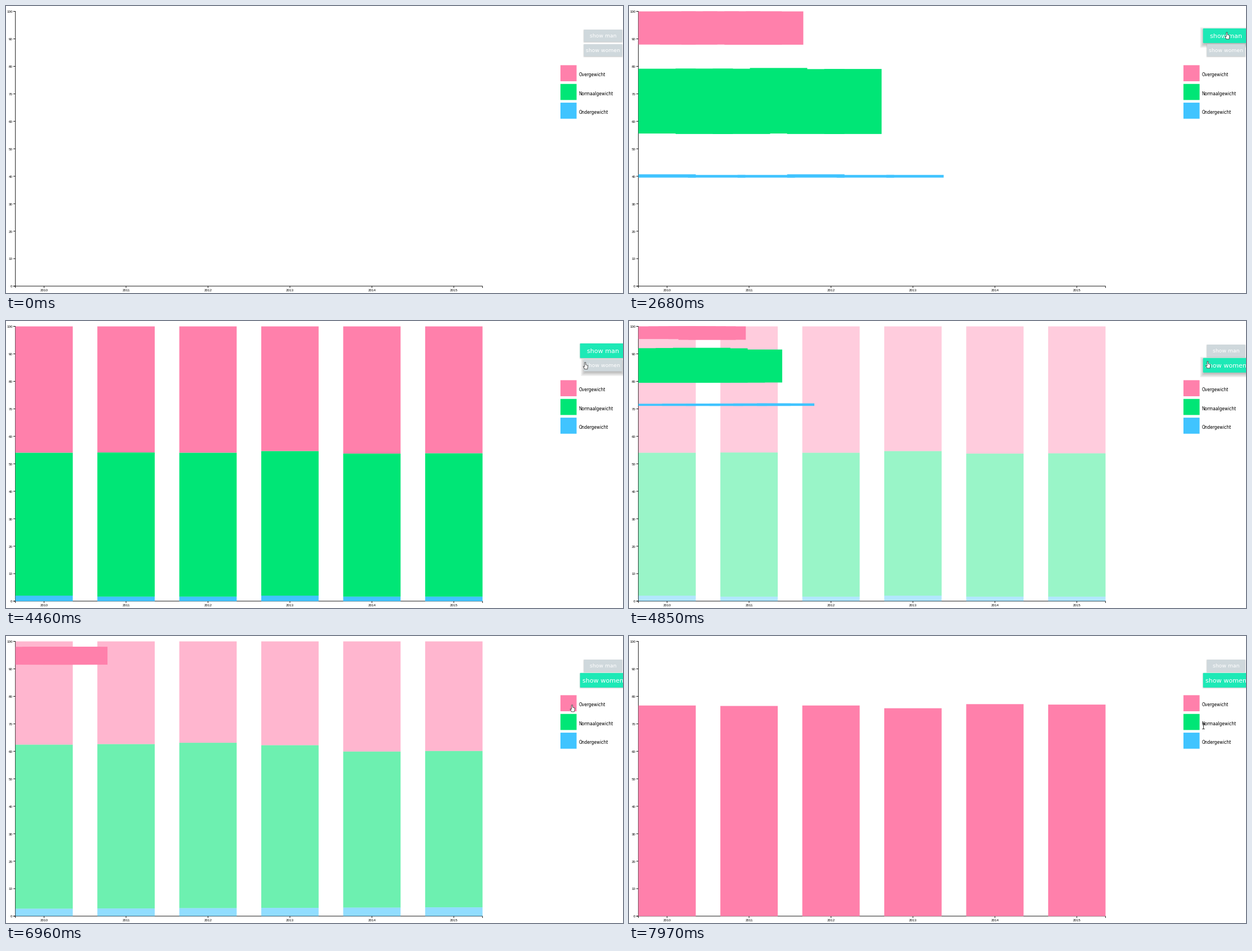
These frames come from a looping animation (1095x511 px, 8000 ms). A matplotlib script:

```python
import numpy as np
import matplotlib.pyplot as plt
from matplotlib.animation import FuncAnimation
from matplotlib.colors import to_rgb
from matplotlib.patches import FancyBboxPatch, Polygon, Rectangle

W, H, DPI = 1095, 511, 72          # at 72 dpi one point is one pixel
LOOP, STEP = 8000, 40
HOLD = 78                          # the screen is redrawn every HOLD ms

PINK, GREEN, BLUE = "#ff80ab", "#00e676", "#40c4ff"
GREY, TEAL = "#cfd8dc", "#1de9b6"

# chart geometry
X0, Y_TOP, Y_BASE = 16.7, 9.6, 498.8
UNIT = (Y_BASE - Y_TOP) / 100
YEARS = np.arange(6)
BAND = 829 / 5.7
BAR_W = 0.7 * BAND

GROW = {PINK: 1200, GREEN: 1000, BLUE: 900}
FADE = 700
CLICK_MAN, CLICK_WOMEN, CLICK_LEGEND = 2168, 4461, 6610

# pointer key points: time, x, y
TRACK = np.array([
    (130, 951, 505), (560, 699, 280), (780, 745, 201), (1700, 1050, 15),
    (2000, 1060, 46), (2652, 1061, 47), (3198, 1050, 36), (3440, 1040, 29),
    (3750, 1010, 45), (4300, 1028, 74), (4836, 1027, 72), (5304, 947, 66),
    (6030, 973, 119), (6400, 1003, 124), (7400, 1006, 122), (7956, 1019, 160),
])

ARROW = np.array([(0, 0), (0, 9.4), (2.1, 7.5), (3.6, 10.8), (4.9, 10.2),
                  (3.5, 7), (6.2, 6.8)])
HAND = np.array([(-1, 0), (1, 0), (1, 4), (5, 5.5), (4, 12), (-1, 12),
                 (-3.5, 7), (-1, 7.5)])
BEAM = np.array([(-2, -5), (2, -5), (0, -5), (0, 5), (2, 5), (-2, 5),
                 (0, 5), (0, -5)])


def ease(u):
    """Cubic in-out."""
    u = min(max(u, 0), 1)
    return 4 * u ** 3 if u < 0.5 else 1 - 4 * (1 - u) ** 3


def pulse(t, on, off, length):
    return ease((t - on) / length) - ease((t - off) / length)


def mix(a, b, u):
    return tuple((1 - u) * p + u * q for p, q in zip(to_rgb(a), to_rgb(b)))


fig = plt.figure(figsize=(W / DPI, H / DPI), dpi=DPI, facecolor="white")
ax = fig.add_axes([0, 0, 1, 1])
ax.set_xlim(0, W)
ax.set_ylim(H, 0)
ax.axis("off")


def line(xs, ys):
    ax.plot(xs, ys, color="black", lw=0.9, zorder=1, snap=False,
            solid_capstyle="butt", solid_joinstyle="miter")


def label(x, y, text, size, ha="left", color="black", font="DejaVu Sans", z=5):
    return ax.text(x, y, text, fontsize=size, ha=ha, va="baseline",
                   color=color, family=font, zorder=z)


def draw_axes():
    right = X0 + 5 * BAND + BAR_W
    line([13, X0, X0, 13], [Y_TOP, Y_TOP, Y_BASE, Y_BASE])
    line([X0, X0, right, right], [502, Y_BASE, Y_BASE, 502])
    for v in range(0, 101, 10):
        y = Y_BASE - v * UNIT
        line([13, X0], [y, y])
        label(11.6, y + 2.6, str(v), 6.3, "right", font="Liberation Sans")
    for x, year in zip(X0 + YEARS * BAND + BAR_W / 2, YEARS + 2010):
        line([x, x], [Y_BASE, 502])
        label(x, 508.4, str(year), 6.3, "center", font="Liberation Sans")


def draw_legend():
    names = ("Overgewicht", "Normaalgewicht", "Ondergewicht")
    for k, (name, color) in enumerate(zip(names, (PINK, GREEN, BLUE))):
        y = 105.4 + 33.35 * k
        ax.add_patch(Rectangle((984, y), 28.6, 28.6, fc=color, lw=0,
                               snap=False, zorder=4))
        label(1016.6, y + 19.8, name, 7.5)


class Bars:
    """Bars flying in from the top left corner, fading out when replaced."""

    def __init__(self, start, end, layers, z):
        self.start, self.end = start, end
        self.items = []
        for color, low, high in layers:
            for k in YEARS:
                bar = Rectangle((0, 0), BAR_W, 0, fc=color, lw=0, snap=False, zorder=z)
                ax.add_patch(bar)
                self.items.append((bar, k, color, low[k], high[k]))

    def update(self, t):
        alpha = 1 - ease((t - self.end) / FADE)
        shown = t > self.start and alpha > 0
        for bar, k, color, low, high in self.items:
            bar.set_visible(shown)
            if shown:
                p = ease((t - self.start) / GROW[color])
                bar.set_xy((X0 + p * k * BAND, Y_TOP + p * (100 - high) * UNIT))
                bar.set_height(p * (high - low) * UNIT)
                bar.set_alpha(alpha)


class Button:
    """Grey button that turns teal and larger once chosen, and lifts on hover."""

    CX, WIDTH, HEIGHT, RINGS = 1059.5, 68, 21.7, 6

    def __init__(self, cy, text, hover, active, z):
        self.cy, self.hover, self.active = cy, hover, active
        self.rings = [self.box(z, "black") for _ in range(self.RINGS)]
        self.face = self.box(z + 0.1, GREY)
        self.text = label(self.CX, cy, text, 9.25, "center", "white", z=z + 0.2)

    def box(self, z, color):
        patch = FancyBboxPatch((0, 0), 1, 1, boxstyle="round,pad=0,rounding_size=1.2",
                               fc=color, lw=0, zorder=z)
        ax.add_patch(patch)
        return patch

    def place(self, patch, w, h, dy=0):
        patch.set_bounds(self.CX - w / 2, self.cy - h / 2 + dy, w, h)

    def update(self, t):
        on = pulse(t, *self.active, 200)
        lift = pulse(t, *self.hover, 250)
        scale = 1 + 0.2 * on
        w, h = self.WIDTH * scale, self.HEIGHT * scale
        blur, drop = 1.2 + 3.8 * lift, 0.8 + 2.4 * lift
        for ring, g in zip(self.rings, np.linspace(-blur, blur, self.RINGS)):
            self.place(ring, w + 2 * g, h + 2 * g, drop)
            ring.set_alpha((0.26 + 0.16 * lift) / self.RINGS)
        self.place(self.face, w, h)
        self.face.set_facecolor(mix(GREY, TEAL, on))
        self.text.set_fontsize(9.25 * scale)
        self.text.set_y(self.cy + 3.5 * scale)


def pointer_shape(x, y):
    on_button = abs(x - Button.CX) < 34 and 42 < y < 90
    on_swatch = 984 < x < 1013 and 105 < y < 201
    if on_button or on_swatch:
        return HAND
    return BEAM if x > 1016 and 115 < y < 195 else ARROW


def stack(under, normal):
    full = 0 * normal + 100
    return [(PINK, normal, full), (GREEN, under, normal), (BLUE, 0 * under, under)]


draw_axes()
draw_legend()

# upper edges of the lower two layers, in percent
men_under = 1.75 + 0.25 * np.cos(2 * np.pi * YEARS / 3)
men_normal = np.array([54.0, 54.1, 54.0, 54.6, 53.7, 53.8])
women_under = 2.7 + 0.1 * YEARS
women_normal = np.array([62.4, 62.6, 63.1, 62.2, 59.9, 60.1])
men_over = (100 - men_normal) / 0.6    # shown on a scale up to 60 percent

parts = [
    Bars(CLICK_MAN, CLICK_WOMEN, stack(men_under, men_normal), 2),
    Bars(CLICK_WOMEN, CLICK_LEGEND, stack(women_under, women_normal), 2.1),
    Bars(CLICK_LEGEND, 2 * LOOP, [(PINK, 0 * men_over, men_over)], 2.2),
    Button(52.9, "show man", (1930, 3190), (CLICK_MAN, CLICK_WOMEN), 6),
    Button(78.8, "show women", (4130, 4930), (CLICK_WOMEN, 2 * LOOP), 7),
]

pointer = Polygon(ARROW, closed=True, fc="white", ec="#333333", lw=0.8, zorder=9)
ax.add_patch(pointer)


def update(i):
    t = i * STEP // HOLD * HOLD
    for part in parts:
        part.update(t)
    x, y = (np.interp(t, TRACK[:, 0], TRACK[:, c]) for c in (1, 2))
    pointer.set_xy(pointer_shape(x, y) + (x, y))
    pointer.set_visible(t > 100)
    return []


anim = FuncAnimation(fig, update, frames=LOOP // STEP, interval=STEP,
                     repeat=True, repeat_delay=0, blit=False)
plt.show()
```
